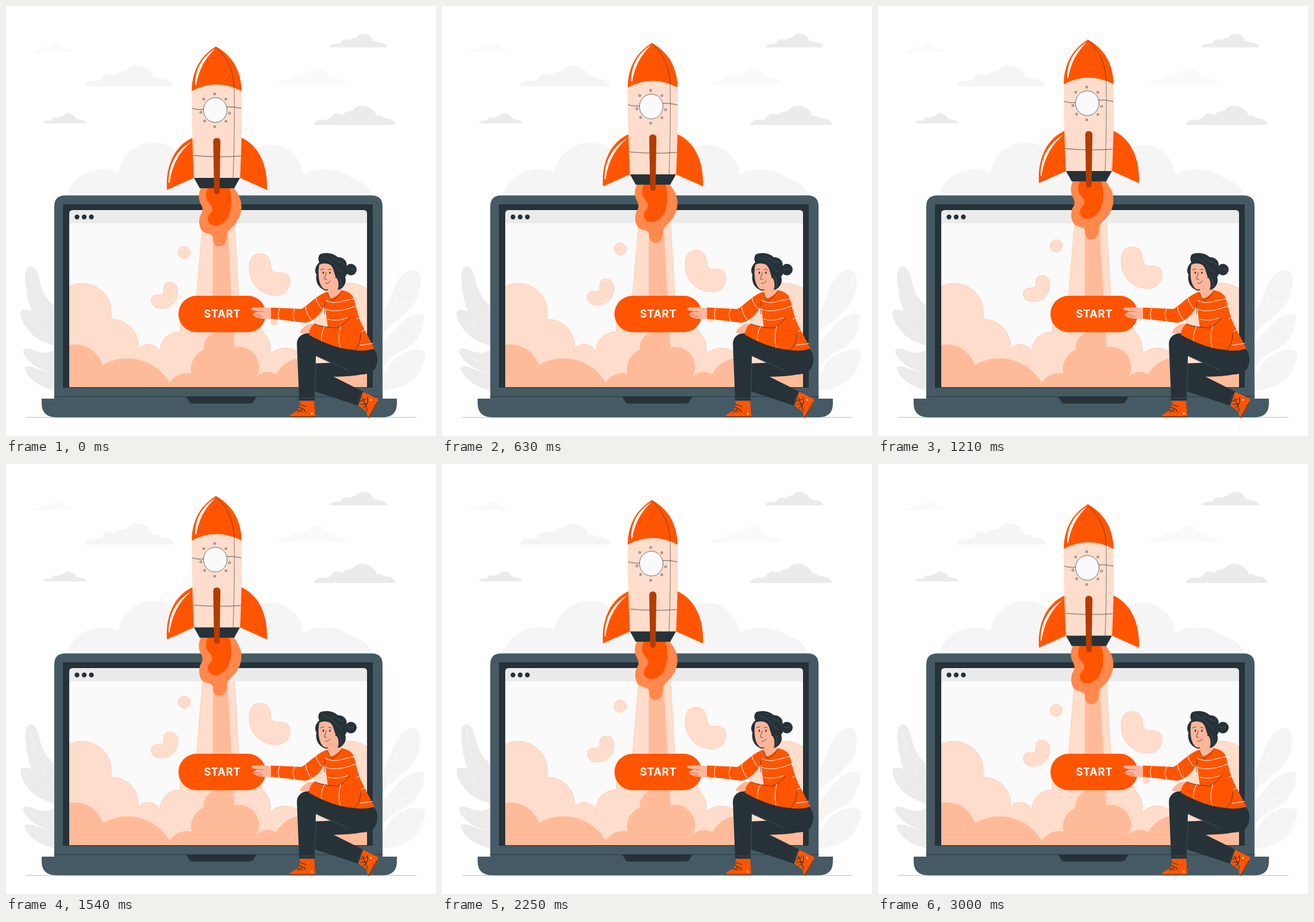
Animation, 748 px wide and 748 px high, one loop 3.04 s. Source, as an HTML page:

```html
<!DOCTYPE html>
<html lang="en">
<head>
<meta charset="utf-8">
<title>Start</title>
<style>
  html, body { margin: 0; width: 100%; height: 100%; overflow: hidden; background: #fff; }
  svg { display: block; width: 100vw; height: 100vh; }
  .rise { animation: rise 1520ms linear infinite alternate; }
  @keyframes rise { to { transform: translateY(-15px); } }
  .orange { fill: #ff5500; }
  .light { fill: #ffddcc; }
  .mid { fill: #ffbb99; }
  .edge { stroke: #ffbb99; stroke-width: .6; }
  .dark { fill: #263238; }
  .slate { fill: #455a64; }
  .skin { fill: #ffb59a; }
  .g1 { fill: #fafafa; }
  .g2 { fill: #f5f5f5; }
  .g3 { fill: #ebebeb; }
  .line { fill: none; stroke: #263238; stroke-width: .8; stroke-linecap: round; }
  .vein { fill: none; stroke: #fff; stroke-width: .8; opacity: .5; }
  .stripe { fill: none; stroke: #fff; stroke-width: 1; stroke-linecap: round; }
  text { font: 700 18.6px Inter, "Open Sans", sans-serif; fill: #fff; text-anchor: middle; letter-spacing: .5px; }
</style>
</head>
<body>
<svg viewBox="0 0 748 748">
  <defs>
    <path id="cloud" d="M0 35C2 29 12 26 22 27C28 27 30 25 32 22C36 15 42 14 49 16L56 17C60 10 70 12 74 9C80 0 92-1 100 2C112 6 118 14 119 20C124 19 130 20 133 24C145 23 155 29 156 35Q156 37 154 37H2Q0 37 0 35Z"/>
    <path id="rivets" d="M363 153h0M382.500 162h0M389 186.500h0M382.500 200.500h0M363 210h0M345.500 200h0M339 185h0M344 162h0" stroke-linecap="round"/>
    <clipPath id="screen"><path d="M110 378H628V663H110Z"/></clipPath>
  </defs>

  <!-- sky -->
  <use href="#cloud" class="g1" transform="translate(48 65) scale(.44 .41)"/>
  <use href="#cloud" class="g2" transform="translate(136 103)"/>
  <use href="#cloud" class="g3" transform="translate(65 186.500) scale(.475 .48)"/>
  <use href="#cloud" class="g3" transform="translate(563 48) scale(.64 .65)"/>
  <use href="#cloud" class="g1" transform="translate(468 107.500) scale(.79 .8)"/>
  <use href="#cloud" class="g3" transform="translate(536 173) scale(.91 .92)"/>
  <path class="g2" d="M104 332A68 68 0 0 1 195 289A64 64 0 0 1 312 268H412A57 57 0 0 1 517 293A85 85 0 0 1 603 300A46 46 0 0 1 638 332Z"/>

  <!-- plants -->
  <g class="g3">
    <path d="M42 453C32 454 33 474 35 488C38 515 40 540 86 575V523C70 512 62 494 58 476C55 462 51 453 42 453Z"/>
    <path d="M27 529C21 536 31 560 50 575C62 584 75 588 86 592V528C76 522 68 523 63 531C54 536 42 526 27 529Z"/>
    <path d="M31 597C26 604 42 624 60 631Q74 637 86 640V598C72 604 66 604 58 602C48 600 37 593 31 597Z"/>
    <path d="M34 627C28 632 44 653 62 661Q74 667 86 669V637C66 640 46 623 34 627Z"/>
  </g>
  <g class="vein">
    <path d="M43 461C48 505 60 538 86 558M30 534Q55 562 86 573M34 601Q56 620 86 624M37 631Q60 650 86 656"/>
    <path d="M37 490L48 494L57 480M45 523L55 516L66 500M42 554L54 555L56 536"/>
  </g>
  <g class="g2">
    <path d="M712 459C698 457 681 473 674 492C665 515 656 530 654 550V570C672 552 700 535 712 515C722 498 727 464 712 459Z"/>
    <path d="M726 536C711 531 690 545 679 560Q664 577 654 588V630C666 608 690 601 706 590C720 579 732 543 726 536Z"/>
    <path d="M728 602C718 592 684 602 671 618Q660 632 654 650V669C680 668 704 658 716 642C724 630 732 608 728 602Z"/>
  </g>
  <path class="vein" style="stroke:#e0e0e0" d="M714 465C700 492 678 525 655 555M723 540Q690 566 655 606M724 606Q684 632 655 661M677 493L686 507L711 510M666 520L676 533L694 530M680 563L687 571L711 577M671 626L687 630L708 641"/>
  <path d="M35 715.500H714" stroke="#bdbdbd" stroke-width="1"/>

  <!-- laptop -->
  <path class="slate" d="M84 688V348.500Q84 329.500 103 329.500H636Q655 329.500 655 348.500V688Z"/>
  <path class="dark" d="M99 345H638V664H99Z"/>
  <path class="g1" d="M110 378H628V663H110Z"/>
  <path class="g3" d="M110 378V361Q110 355 116 355H622Q628 355 628 361V378Z"/>
  <g class="dark"><circle cx="123.500" cy="367" r="4.200"/><circle cx="136" cy="367" r="4.200"/><circle cx="148.500" cy="367" r="4.200"/></g>

  <!-- smoke -->
  <g clip-path="url(#screen)">
    <path class="light edge" d="M109 664V488A51 51 0 0 1 182 545A46 46 0 0 1 230 597A22 22 0 0 1 268 603A33 33 0 0 1 303 567V543H440L447 567A42 42 0 0 1 459 606A38 38 0 0 1 505 600L562 592A51 51 0 0 1 629 492V664Z"/>
    <path class="light edge" d="M343.500 360H396.500L406 520V545H330V520Z"/>
    <path class="mid edge" d="M109 664V590A51 51 0 0 1 168 625A85 85 0 0 1 285 656A34 34 0 0 1 323 640A36 36 0 0 1 344 598Q343 578 360 570V360H384L397 594A35 35 0 0 1 433 649A27 27 0 0 1 470 641A55 55 0 0 1 508 613L545 640H629V664Z"/>
  </g>
  <g class="light edge rise">
    <circle cx="310" cy="429" r="10.700"/>
    <circle cx="466.500" cy="549.800" r="6"/>
    <path d="M284 481C294 480 300 487 299 499C298 515 285 527 270 526C258 527 251 518 253 510C255 501 263 503 270 502C277 500 273 493 275 487C277 482 280 481 284 481Z"/>
    <path d="M441 431C452 430 459 437 460 449C461 461 466 465 476 464C489 463 495 470 494 480C493 498 480 505 464 503C438 500 422 479 423 454C423 440 429 431 441 431Z"/>
  </g>

  <path class="slate" d="M62 683H84L90 679H650L655 683H680V691Q680 715.500 655 715.500H88Q62 715.500 62 691Z"/>
  <path class="line" d="M84 679.500H655"/>
  <path class="dark" d="M313 679H436L431 687Q429 691.500 424 691.500H325Q320 691.500 318 687Z"/>

  <rect class="orange" x="300" y="504" width="152" height="63.500" rx="31.500"/>
  <text x="376.200" y="541.700">START</text>

  <!-- rocket -->
  <g class="rise">
    <path fill="#ff884d" d="M340 316C335 322 334 335 338 343C342 350 344 356 338 364C335 372 335 385 342 392C347 397 357 394 360 402C360 410 362 418 371 418C380 418 384 410 384 402C384 388 396 386 402 374C410 362 411 348 408 338C405 328 400 322 396 316Z"/>
    <path class="orange" d="M352 316C346 325 347 336 353 342C360 350 361 356 355 361C349 367 350 377 358 381C366 384 379 380 386 367C393 354 394 331 388 316Z"/>
    <path class="orange" d="M325 229C297 241 277 273 280 320L327 299ZM409 229C437 241 456 273 454 320L407 299Z"/>
    <path class="light" d="M323 147Q366 122 410 147Q411 225 407 300H327Q323 225 323 147Z"/>
    <path class="orange" d="M365 70.500C342 85 324 107 323 148Q366 125 410 148C409 108 390 84 365 70.500Z"/>
    <path fill="#fff" d="M283 308C282 277 297 250 323 236C302 252 288 278 285 307ZM329 138C329 108 342 88 364 74C346 92 336 109 331 137Z"/>
    <path class="line" style="stroke-width:.6" d="M365 71C387 92 397 116 397 146Q398 225 395 299"/>
    <path class="line" d="M324 178Q333 181 344 180M384 175.500Q398 175 409 178M326 260Q366 264 408 261"/>
    <ellipse class="g1" cx="364" cy="181" rx="20.500" ry="21.500" stroke="#263238" stroke-width=".7"/>
    <use href="#rivets" stroke="#263238" stroke-width="4"/>
    <use href="#rivets" stroke="#ffddcc" stroke-width="2.400"/>
    <path class="dark" d="M327 299H407L397 317H337Z"/>
    <path fill="#b33c00" d="M360.500 236Q360.500 229.500 366.500 229.500Q373 229.500 373 236L371.500 323Q371 327.500 367 327.500Q362.500 327.500 362 323Z"/>
  </g>

  <!-- woman: legs -->
  <path class="dark" d="M530 622L602 619L643 630Q632 644 570 645L622 671L612 695L530 668Z"/>
  <path class="dark" d="M510 686L506 588C506 575 516 568 530 569L562 578L604 596L638 595C648 604 649 622 640 633C632 642 616 643 600 637L539 609L537 687Z"/>
  <path class="line" style="stroke:#455a64" d="M541 609L596 634M539 624L537 682M513 682H536M612 689L618 675"/>
  <g class="orange">
    <path d="M511 687L536 686.500L538 715H493Q493 710 503 706Q512 701 511 687Z"/>
    <path d="M621 671L646 683Q649 687 645 693L632 716Q627 714 628 706L613 695Z"/>
  </g>
  <path class="line" style="stroke-width:1.200" d="M493 714.500H538M646 689L631 716M506 703L516 706M510 698L520 703M511 693L522 697M508 707Q516 696 521 706M616 688L626 684M617 693L628 692M620 682L629 704M628 681Q632 692 622 698"/>
  <g fill="#ffddcc"><circle cx="532" cy="709" r="1.800"/><circle cx="635" cy="685" r="1.800"/></g>

  <!-- woman: arms and body -->
  <path class="skin" d="M463 526L447 524L430 524.500Q426 525 427 528Q429 530 439 531Q427 535 430 538Q434 543 446 544L463 545Z"/>
  <path class="line" style="stroke:#b35c40" d="M439 531L447 532M431 537L444 538M437 541L447 541"/>
  <path class="orange" d="M461 524.500L514 527C524 522 538 505 556 498L582 494Q599 496 605 508C609 522 612 542 622 560L641 596Q622 602 604 598L562 577L555 522Q540 548 520 551Q490 547 461 544Z"/>
  <path class="skin" d="M541 553Q527 551 519 558Q510 565 512 569Q520 570 528 569L540 571Z"/>
  <path class="orange" d="M536 553Q556 559 578 560L600 540L617 565Q619 590 604 598Q570 596 527 572Q527 560 536 553Z"/>
  <path class="line" d="M578 559Q590 554 597 543M554 536L555 515M607 597Q617 589 617 570M537 553Q556 560 578 560"/>
  <g class="stripe">
    <path d="M476 526Q472 535 475 545M502 527Q497 537 502 548M521 523Q523 537 531 546M539 508Q542 520 552 529"/>
    <path d="M556 528Q576 535 608 522M556 512Q568 519 583 514L606 509M560 545Q580 549 594 542M610 545L616 542M618 566L626 563M616 590L638 587"/>
    <path d="M554 558Q547 570 549 582M582 557Q577 576 581 594"/>
  </g>

  <!-- woman: head -->
  <circle class="dark" cx="600" cy="458.500" r="10"/>
  <path class="dark" d="M545 446C538 452 536 461 540 467C538 478 542 490 555 495L578 494C589 490 593 480 590 471Q598 461 592 453C595 444 586 436 577 437C569 429 555 428 546 432Q541 438 545 446Z"/>
  <path class="skin" d="M561 484L578 480Q579 490 584 496Q574 507 564 509Q558 500 561 484Z"/>
  <path class="skin" d="M545 450C542 466 544 480 549 488C554 496 563 494 568 487Q576 488 579 481Q579 472 573 473Q575 459 566 447Q552 445 545 450Z"/>
  <path class="dark" d="M545 450C551 447 559 447 565 451C571 457 570 466 575 473Q581 481 577 494Q587 492 589 482L586 452L562 438L546 440Z"/>
  <path class="line" style="stroke:#455a64" d="M551 438Q564 440 571 449T585 463M563 434Q573 445 587 447M579 471Q584 476 582 488M594 457Q600 461 606 456"/>
  <g class="dark"><ellipse cx="552" cy="464" rx="1.300" ry="1.900"/><ellipse cx="563.500" cy="464" rx="1.300" ry="1.900"/></g>
  <path class="line" d="M547 459Q550 456 553 458M560 459Q564 456 567 460M557 464L554 475L558 476M556 482Q561 484 564 478"/>
  <path class="line" d="M560 500Q563 510 568 513Q578 506 584 496"/>
</svg>
</body>
</html>
```
